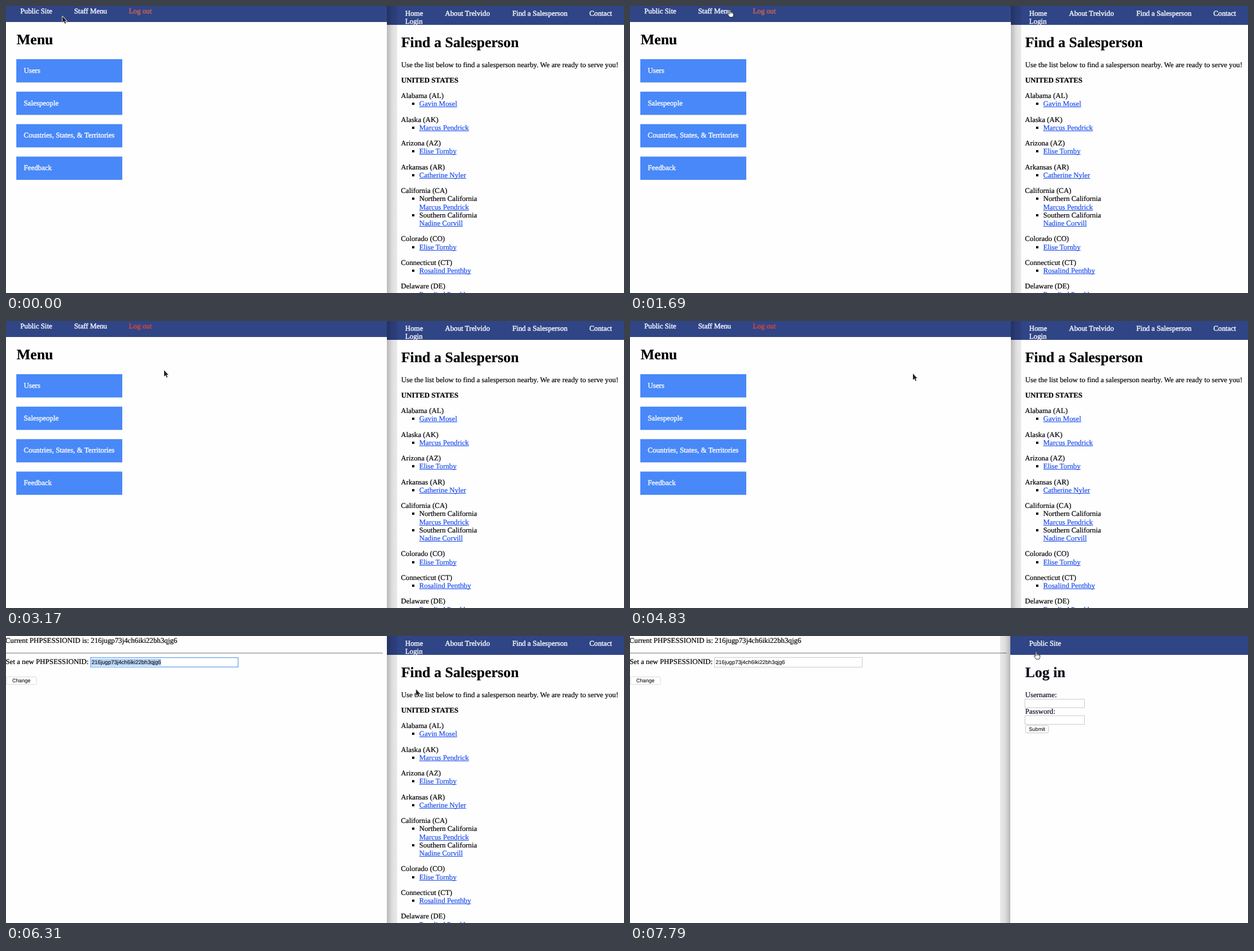
Animation of 1079 by 502 pixels, one loop 8 s. Source, as an HTML page with a canvas:

```html
<!DOCTYPE html>
<html lang="en">
<head>
<meta charset="utf-8">
<title>Session demo</title>
<style>
html, body { margin: 0; width: 100%; height: 100%; overflow: hidden; background: #fefefe; }
canvas { display: block; width: 1079px; height: 502px; }
</style>
</head>
<body>
<canvas id="stage" width="1079" height="502"></canvas>
<script>
const canvas = document.getElementById('stage');
const ctx = canvas.getContext('2d');
const LOOP = 8000, SWITCH = 5360, FOCUS = 6460, LOGIN = 7790;
const PAPER = '#fefefe', NAVY = '#304586', BLUE = '#4888f8', LINK = '#1a4cec';
const SERIF = '"Liberation Serif", "Times New Roman", serif';
const SANS = '"Liberation Sans", Arial, sans-serif';
const BODY = `12.75px ${SERIF}`;
const BOLD = `bold 12.75px ${SERIF}`;
const HEAD = `bold 25.5px ${SERIF}`;
const SESSION = '216jugp73j4ch6iki22bh3qjg6';

const states = [
  ['Alabama (AL)', 'Gavin Mosel'],
  ['Alaska (AK)', 'Marcus Pendrick'],
  ['Arizona (AZ)', 'Elise Tornby'],
  ['Arkansas (AR)', 'Catherine Nyler'],
  ['California (CA)', ['Northern California', 'Marcus Pendrick'], ['Southern California', 'Nadine Corvill']],
  ['Colorado (CO)', 'Elise Tornby'],
  ['Connecticut (CT)', 'Rosalind Penthby'],
  ['Delaware (DE)', 'Rosalind Penthby']
];

// Pointer moves: start, end, steps, curve control point, end point
const moves = [
  [70, 610, 5, 102, 32, 111, 42],
  [910, 1690, 8, 136, 28, 174, 6],
  [1770, 1920, 3, 175, 7, 174, 8],
  [2700, 3170, 4, 222, 44, 276, 86],
  [3720, 4200, 4, 312, 104, 350, 73],
  [4510, 4830, 3, 420, 58, 494, 92],
  [5990, 6460, 4, 640, 94, 791, 93],
  [6780, 7010, 3, 752, 62, 709, 27]
];

function rect(x, y, w, h, color) {
  ctx.fillStyle = color;
  ctx.fillRect(x, y, w, h);
}

// A thin stroke gives the text its soft, slightly heavy look
function text(str, x, y, font = BODY, color = '#000', weight = 0.2) {
  ctx.font = font;
  ctx.fillStyle = ctx.strokeStyle = color;
  ctx.lineWidth = weight;
  ctx.fillText(str, x, y);
  ctx.strokeText(str, x, y);
}

function lightText(str, x, y, color = '#f6f7fc') {
  text(str, x, y, BODY, color, 0.45);
}

function link(str, x, y) {
  text(str, x, y, BODY, LINK);
  rect(x, Math.round(y + 1), ctx.measureText(str).width, 1, LINK);
}

function box(x, y, w, h, border, radius = 0) {
  ctx.beginPath();
  ctx.roundRect(x + 0.5, y + 0.5, w - 1, h - 1, radius);
  ctx.fillStyle = '#fff';
  ctx.fill();
  ctx.strokeStyle = border;
  ctx.lineWidth = 1;
  ctx.stroke();
}

function shadow(from, to) {
  const g = ctx.createLinearGradient(from, 0, to, 0);
  g.addColorStop(0, 'rgba(0,0,0,0.28)');
  g.addColorStop(0.5, 'rgba(0,0,0,0.13)');
  g.addColorStop(1, 'rgba(0,0,0,0.08)');
  rect(Math.min(from, to), 0, Math.abs(to - from), 502, g);
}

function drawMenu(t) {
  rect(0, 0, 665, 28, NAVY);
  lightText('Public Site', 25, 13);
  lightText('Staff Menu', 119, 13);
  lightText('Log out', 214.5, 13, t < 2700 ? '#cb6450' : '#dc4632');
  text('Menu', 18.5, 67, HEAD);
  ['Users', 'Salespeople', 'Countries, States, & Territories', 'Feedback'].forEach((label, i) => {
    const y = 93 + i * 56.8;
    rect(18, y, 185, 40.7, BLUE);
    lightText(label, 31, y + 23.8);
  });
}

function drawSession(focused) {
  text('Current PHPSESSIONID is: ' + SESSION, -1, 12);
  rect(0, 29, 658, 1.6, '#aaa5a8');
  text('Set a new PHPSESSIONID:', -0.5, 49);
  if (focused) {
    rect(147, 37, 259, 18, '#7db1ee');
    rect(148.5, 38.5, 256, 15, '#fff');
    rect(149, 40, 122, 12, '#b4d4f6');
  } else {
    box(147, 37, 259, 18, '#cbcbcb');
  }
  text(SESSION, 149.5, 49, `9.55px ${SANS}`, '#111', 0.1);
  box(0, 71, 54, 14, '#dadada', 2);
  text('Change', 11, 81, `9.1px ${SANS}`, '#111', 0.1);
}

function drawList() {
  [['Home', 697], ['About Trelvido', 766.5], ['Find a Salesperson', 884], ['Contact', 1018.5]]
    .forEach(([label, x]) => lightText(label, x, 17));
  lightText('Login', 697, 31);
  text('Find a Salesperson', 690, 72, HEAD);
  text('Use the list below to find a salesperson nearby. We are ready to serve you!', 690, 107);
  text('UNITED STATES', 690, 134, BOLD);
  let y = 161;
  for (const [state, ...people] of states) {
    text(state, 689.5, y);
    for (const entry of people) {
      y += 14.3;
      rect(709, Math.round(y - 6), 4, 4, '#000');
      if (Array.isArray(entry)) {
        text(entry[0], 721.5, y);
        y += 14.3;
        link(entry[1], 721.5, y);
      } else {
        link(entry, 721.5, y);
      }
    }
    y += 27.2;
  }
}

function drawLogin() {
  const ink = '#0c0c1c';
  lightText('Public Site', 697, 17);
  text('Log in', 690, 72, HEAD, ink);
  text('Username:', 690, 107, BODY, ink);
  box(689, 110, 105, 16, '#cbcbcb');
  text('Password:', 690, 136, BODY, ink);
  box(689, 139, 105, 16, '#cbcbcb');
  box(690, 156, 41, 14, '#c6c6c6', 2);
  text('Submit', 696.5, 166, `9.1px ${SANS}`, '#111', 0.1);
}

function pointerAt(t) {
  let x = 98.5, y = 18;
  for (const [start, end, steps, cx, cy, ex, ey] of moves) {
    if (t < start) break;
    const i = Math.floor((t - start) / (end - start) * (steps - 1) + 1e-6);
    const u = Math.min(i + 1, steps) / steps, v = 1 - u;
    x = v * v * x + 2 * u * v * cx + u * u * ex;
    y = v * v * y + 2 * u * v * cy + u * u * ey;
  }
  return [x, y];
}

function overLink(x, y, t) {
  const inside = (left, right, top, bottom) => x >= left && x <= right && y >= top && y <= bottom;
  return t < SWITCH
    ? inside(119, 177, 3, 18) || inside(214, 256, 3, 18)
    : inside(697, 728, 20, 33);
}

function drawArrow() {
  const outline = new Path2D('M0 0V11L2.6 8.8L4.5 13L6.1 12.3L4.3 8.2H7.6Z');
  ctx.strokeStyle = '#fff';
  ctx.lineWidth = 1.6;
  ctx.stroke(outline);
  ctx.fillStyle = '#222';
  ctx.fill(outline);
}

function drawHand() {
  const hand = new Path2D('M-1 7V1Q0-.5 1 1V5Q2.2 4 3.2 5.4Q4.4 4.6 5.2 6Q6.7 5.6 6.8 7.2V9.5L5.5 13.5H0L-3.5 8.5Q-3.8 6.8-2.3 7.1L-1 8.5Z');
  const fingers = new Path2D('M1 5V8M3.2 5.5V8M5.2 6V8');
  ctx.fillStyle = '#fff';
  ctx.fill(hand);
  ctx.strokeStyle = '#222';
  ctx.lineWidth = 0.9;
  ctx.stroke(hand);
  ctx.lineWidth = 0.6;
  ctx.stroke(fingers);
}

function drawPointer(t) {
  const [x, y] = pointerAt(t);
  ctx.save();
  ctx.translate(x, y);
  if (overLink(x, y, t)) drawHand();
  else drawArrow();
  ctx.restore();
}

function draw(t) {
  const rightInFront = t >= FOCUS;
  const edge = rightInFront ? 664 : 665;
  rect(0, 0, 1079, 502, PAPER);
  rect(edge, 0, 1079 - edge, 33, NAVY);
  if (t < LOGIN) drawList();
  else drawLogin();
  if (t < SWITCH) drawMenu(t);
  else drawSession(!rightInFront);
  if (rightInFront) shadow(664, 646);
  else shadow(665, 683);
  drawPointer(t);
}

ctx.textRendering = 'geometricPrecision';
ctx.lineJoin = 'round';
const began = performance.now();
function tick() {
  draw((performance.now() - began) % LOOP);
  requestAnimationFrame(tick);
}
tick();
</script>
</body>
</html>
```
